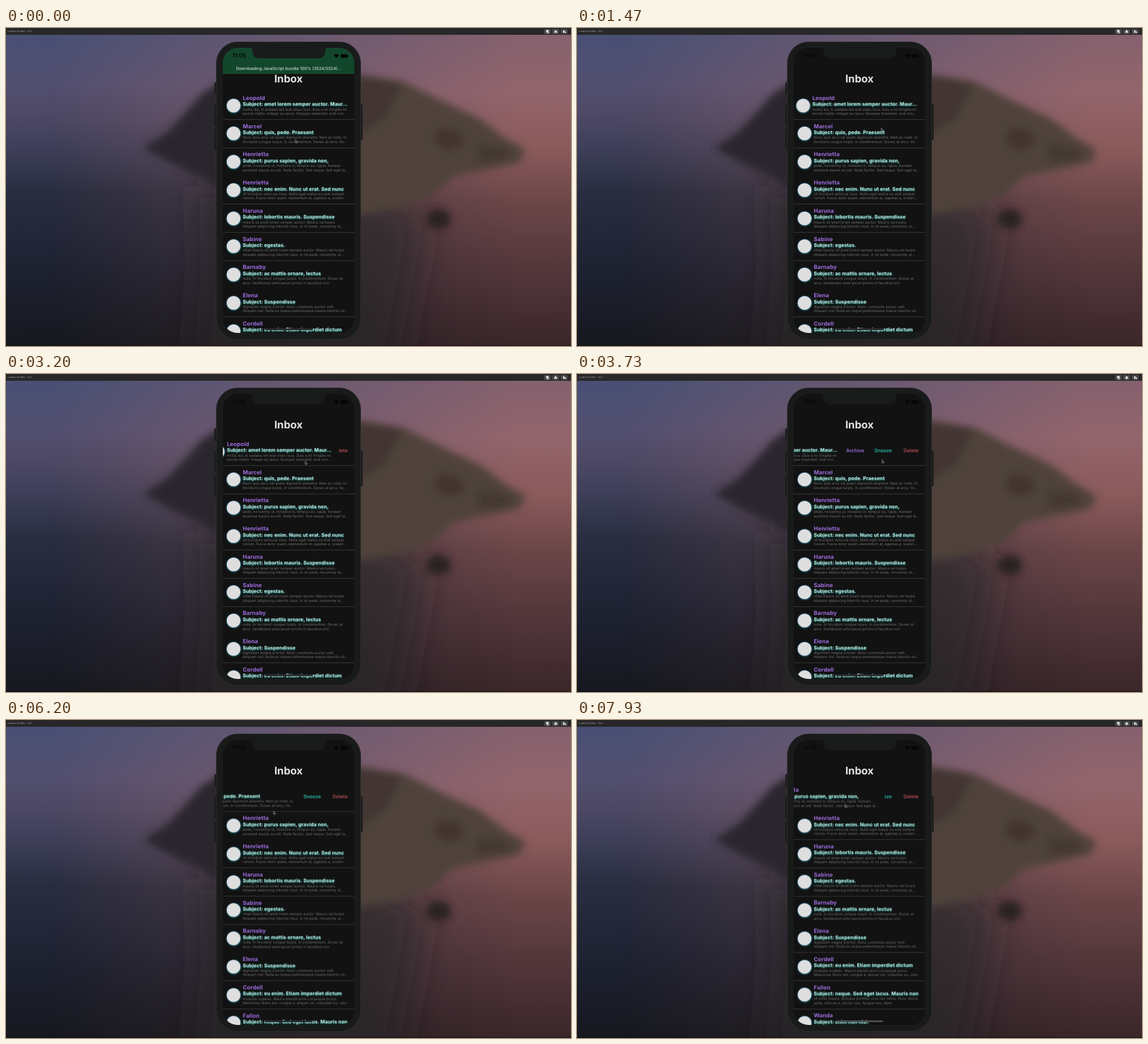
These frames come from a looping animation (998x561 px, 8000 ms). An HTML page:

```html
<!DOCTYPE html>
<html lang="en">
<head>
<meta charset="utf-8">
<title>Inbox</title>
<style>
html, body { margin: 0; width: 100%; height: 100%; overflow: hidden; background: #15171f; }
#stage { position: relative; width: 998px; height: 561px; overflow: hidden;
  font-family: Inter, Roboto, sans-serif; text-rendering: geometricPrecision; white-space: pre; }
#stage div, #stage svg, #stage span { position: absolute; }

/* Wallpaper */
#sky { inset: 0; background: linear-gradient(#485075 2%, #524f70 18%, #4c4864 28%, #3d3e58 38%, #292d40 52%, #1e2232 75%, #16181f); }
#dusk { inset: 0; background: linear-gradient(#85616e 2%, #93656c 20%, #8a5a5b 38%, #6c4648 55%, #54373b 75%, #3a2629);
  mask-image: linear-gradient(90deg, transparent 8%, #000 90%); }
#island { left: 0; top: 0; }
#floor { left: 0; top: 560px; width: 100%; height: 1px; background: #0a0a0c; }

/* Simulator bar */
#bar { left: 0; top: 0; width: 100%; height: 12px; background: #282728; color: #a9a9a9; }
#bar span { left: 3px; top: 0; font-size: 4.1px; line-height: 12.5px; }
#bar svg { left: 950px; top: 2px; }

/* Device */
.key { background: #1b1c1d; border-radius: 1px; }
#body { left: 371px; top: 24px; width: 254px; height: 524px; border: 1px solid #2b2d2d;
  border-radius: 38px; background: #191b1b; }
#screen { left: 383px; top: 35px; width: 232px; height: 503px; border-radius: 26px;
  background: #121212; overflow: hidden; }
#banner { left: 0; top: 0; width: 232px; height: 46px; background: #14482d; color: #eef5f0;
  animation: fade 8s linear infinite; }
#banner span { left: 0; right: 0; top: 31px; text-align: center; font-size: 7.42px; line-height: 12px; }
#clock { left: 17px; top: 8px; font-size: 9.9px; font-weight: 600; line-height: 12px; color: #050605; }
#status { left: 0; top: 0; }
#title { left: 0; right: 0; top: 43px; text-align: center; font-size: 18.56px; font-weight: 700;
  line-height: 24px; color: #e3e3e3; }
#home { left: 74px; top: 495px; width: 84px; height: 3px; border-radius: 2px;
  animation: home 8s step-end infinite; }

/* Mail list */
#actions { left: 83.5px; top: 77px; width: 148.5px; height: 49px; }
#actions span { top: 0; width: 49.5px; text-align: center; font-size: 8.66px; font-weight: 600; line-height: 49px; }
#list { left: 0; top: 78px; width: 232px; height: 425px; overflow: hidden; }
#rows { left: 0; top: -1px; animation: remove 8s step-end infinite; }
.slot { left: 0; width: 232px; height: 49.75px; overflow: hidden; }
.slot::after { content: ""; position: absolute; left: 0; right: 0; bottom: 0; height: .75px; background: #3a3a3a; }
.mail { left: 0; top: 0; width: 232px; height: 49px; background: #121212; }
.mail span { left: 35.2px; }
.face { left: 6.5px; top: 12.5px; width: 24px; height: 24px; border-radius: 50%; background: #dedede;
  box-shadow: 0 0 0 .6px #36598a, .3px .6px 2.4px .8px #17746f; }
.name { top: 5.9px; font-size: 9.9px; line-height: 12px; font-weight: 700; letter-spacing: .1px; color: #9d6cdd; }
.subject { top: 17.3px; font-size: 8.66px; line-height: 12px; font-weight: 700; letter-spacing: .06px;
  color: #c0e9e0; text-shadow: 0 .5px 3px #17948a; }
.preview { top: 28.6px; font-size: 6.19px; line-height: 7.5px; letter-spacing: .08px; color: #767676; }
#pointer { left: 0; top: 0; overflow: visible; animation: point 8s linear infinite; }

.swipe0 { animation: swipe0 8s linear infinite; }
.swipe1 { animation: swipe1 8s linear infinite; }
.swipe2 { animation: swipe2 8s linear infinite; }

@keyframes fade { 0% { opacity: 1; } 2.5%, 100% { opacity: 0; } }
@keyframes home { 0% { background: #2d2d2d; } 88.3%, 100% { background: #505050; } }
@keyframes remove {
  0% { transform: none; }
  63.3% { transform: translateY(-49.75px); }
  88.3%, 100% { transform: translateY(-99.5px); }
}
@keyframes swipe0 {
  0%, 8.7% { transform: translateX(0); }
  10.5% { transform: translateX(-6px); }
  12.5% { transform: translateX(-14.8px); }
  14.2% { transform: translateX(-18px); }
  16.3% { transform: translateX(-10.5px); }
  18.4% { transform: translateX(-2.5px); }
  19.1%, 32% { transform: translateX(0); }
  38.4% { transform: translateX(-16px); }
  40% { transform: translateX(-28px); }
  43.75% { transform: translateX(-60px); animation-timing-function: cubic-bezier(.2, .7, .3, 1); }
  48.8%, 100% { transform: translateX(-148.5px); }
}
@keyframes swipe1 {
  0%, 70.2% { transform: translateX(0); }
  75.9% { transform: translateX(-80.5px); }
  77.5% { transform: translateX(-94.5px); }
  79.1% { transform: translateX(-102.5px); animation-timing-function: cubic-bezier(.2, .7, .3, 1); }
  84%, 100% { transform: translateX(-148.5px); }
}
@keyframes swipe2 {
  0%, 92.3% { transform: translateX(0); }
  97.5%, 100% { transform: translateX(-72px); }
}
@keyframes point {
  0%, 16.6% { transform: translate(510.5px, 196px); }
  18.4% { transform: translate(537px, 175.5px); }
  19.1% { transform: translate(552px, 162px); }
  24.1% { transform: translate(568.5px, 152px); }
  25.9%, 28.1% { transform: translate(569px, 151px); }
  33.8% { transform: translate(556px, 151px); }
  38.4% { transform: translate(540px, 152px); }
  40% { transform: translate(528px, 153px); }
  43.75% { transform: translate(496px, 158px); }
  49.1% { transform: translate(574px, 144px); }
  54.1%, 55.2% { transform: translate(568px, 139px); }
  59.1%, 65% { transform: translate(586px, 136px); }
  69.4% { transform: translate(578px, 146px); }
  75.9% { transform: translate(486px, 158px); }
  77.5% { transform: translate(472px, 160px); }
  79.1% { transform: translate(464px, 159px); }
  85.9%, 88.4% { transform: translate(588px, 137px); }
  91.2% { transform: translate(560px, 143px); }
  97.5%, 98.4% { transform: translate(474px, 147px); }
  99%, 100% { transform: translate(473px, 148px); }
}
</style>
</head>
<body>
<div id="stage">
  <div id="sky"></div>
  <div id="dusk"></div>
  <svg id="island" width="998" height="561">
    <defs>
      <filter id="soft" x="-20%" y="-20%" width="140%" height="140%"><feGaussianBlur stdDeviation="7"/></filter>
      <filter id="haze" x="-40%" y="-40%" width="180%" height="180%"><feGaussianBlur stdDeviation="30"/></filter>
    </defs>
    <g filter="url(#haze)">
      <path d="M340 280H640L740 330 720 440 690 600H330L345 420Z" fill="#2a2324" opacity=".6"/>
    </g>
    <g filter="url(#soft)">
      <path d="M242 212L284 184 318 148 346 116 376 96 500 70 640 84 704 95 766 127 837 160 881 194 917 214 908 238 850 250 790 262 755 295 690 318 620 330 380 290 340 262 285 236Z" fill="#50423b"/>
      <path d="M242 212L284 184 318 148 346 116 380 94V290L340 262 285 236Z" fill="#2c282d"/>
      <path d="M620 84L700 97 670 160 620 190Z" fill="#423633"/>
      <path d="M765 175L800 180 812 205 780 218 755 200Z" fill="#43362f"/>
      <path d="M830 205L885 212 890 232 835 238Z" fill="#453733"/>
      <ellipse cx="764" cy="337" rx="22" ry="18" fill="#2b2224"/>
    </g>
  </svg>
  <div id="floor"></div>

  <div id="bar">
    <span>Lumbra 20 Max – 14.0</span>
    <svg width="44" height="9" fill="#e2e2e2">
      <g fill="#4b4a4b"><rect x=".5" width="12" height="8.5" rx="1.5"/><rect x="15" width="12" height="8.5" rx="1.5"/><rect x="30" width="12" height="8.5" rx="1.5"/></g>
      <path d="M4 1.5h4.5v4H4zM5.5 6h3.5v1.2H5.5zM18 4.4L21 1.6 24 4.4H23.2V7H21.6V5.2H20.4V7H18.8V4.4zM34 2h2.5v4.5H34zM37 4h2v2.8H37z"/>
    </svg>
  </div>

  <div class="key" style="left:368px;top:96px;width:4px;height:22px"></div>
  <div class="key" style="left:368px;top:135px;width:4px;height:39px"></div>
  <div class="key" style="left:368px;top:178px;width:4px;height:38px"></div>
  <div class="key" style="left:626px;top:135px;width:4px;height:63px"></div>
  <div id="body"></div>
  <div id="screen">
    <div id="banner"><span>Downloading JavaScript bundle 100% (3524/3524)...</span></div>
    <span id="clock">11:05</span>
    <svg id="status" width="232" height="46">
      <path d="M48 0C51.500 0 52 2 52 5 52 14 57 18.500 65 18.500H168C176 18.500 181 14 181 5 181 2 181.500 0 185 0Z" fill="#191b1b"/>
      <g fill="#050605">
        <path d="M200.500 18L195.800 12.800A7 7 0 0 1 205.200 12.800Z"/>
        <rect x="208" y="11.200" width="12.500" height="6.300" rx="1.800"/>
        <rect x="221" y="13.300" width="1" height="2.200" rx=".5"/>
      </g>
    </svg>
    <span id="title">Inbox</span>
    <div id="actions">
      <span style="left:0;color:#9a6ddb">Archive</span>
      <span style="left:49.5px;color:#25b5a4">Snooze</span>
      <span style="left:99px;color:#b04a4f">Delete</span>
    </div>
    <div id="list"><div id="rows"></div></div>
    <div id="home"></div>
  </div>
  <svg id="pointer" width="6" height="9">
    <path d="M.4 .4V6.200L1.700 5 2.600 7.100 3.600 6.700 2.700 4.700H4.500Z" fill="#161616" stroke="#b9b9b9" stroke-width=".6"/>
  </svg>
</div>
<script>
const mails = [
  ["Leopold", "amet lorem semper auctor. Maur...", "mollis dui, in sodales elit erat vitae risus. Duis a mi fringilla mi\nlacinia mattis. Integer eu lacus. Quisque imperdiet, erat non..."],
  ["Marcel", "quis, pede. Praesent", "Nunc quis arcu vel quam dignissim pharetra. Nam ac nulla. In\ntincidunt congue turpis. In condimentum. Donec at arcu. Ve..."],
  ["Henrietta", "purus sapien, gravida non,", "pede, nonummy ut, molestie in, tempus eu, ligula. Aenean\neuismod mauris eu elit. Nulla facilisi. Sed neque. Sed eget la..."],
  ["Henrietta", "nec enim. Nunc ut erat. Sed nunc", "Ut tincidunt vehicula risus. Nulla eget metus eu erat semper\nrutrum. Fusce dolor quam, elementum at, egestas a, sceleri..."],
  ["Haruna", "lobortis mauris. Suspendisse", "mauris sit amet lorem semper auctor. Mauris vel turpis.\nAliquam adipiscing lobortis risus. In mi pede, nonummy ut,..."],
  ["Sabine", "egestas.", "vitae mauris sit amet lorem semper auctor. Mauris vel turpis.\nAliquam adipiscing lobortis risus. In mi pede, nonummy ut,..."],
  ["Barnaby", "ac mattis ornare, lectus", "nulla. In tincidunt congue turpis. In condimentum. Donec at\narcu. Vestibulum ante ipsum primis in faucibus orci"],
  ["Elena", "Suspendisse", "dignissim magna a tortor. Nunc commodo auctor velit.\nAliquam nisl. Nulla eu neque pellentesque massa lobortis ult..."],
  ["Cordell", "eu enim. Etiam imperdiet dictum", "molestie sodales. Mauris blandit enim consequat purus.\nMaecenas libero est, congue a, aliquet vel, vulputate eu, odio."],
  ["Fallon", "neque. Sed eget lacus. Mauris non", "sit amet massa. Quisque porttitor eros nec tellus. Nunc lectus\npede, ultrices a, auctor non, feugiat nec, diam."],
  ["Wanda", "enim non nisi.", ""]
];
const pitch = 49.75;
document.getElementById("rows").innerHTML = mails.map(([name, subject, preview], i) =>
  `<div class="slot" style="top:${i * pitch}px"><div class="mail swipe${i}"><div class="face"></div>` +
  `<span class="name">${name}</span><span class="subject">Subject: ${subject}</span>` +
  `<span class="preview">${preview}</span></div></div>`).join("");
</script>
</body>
</html>
```
